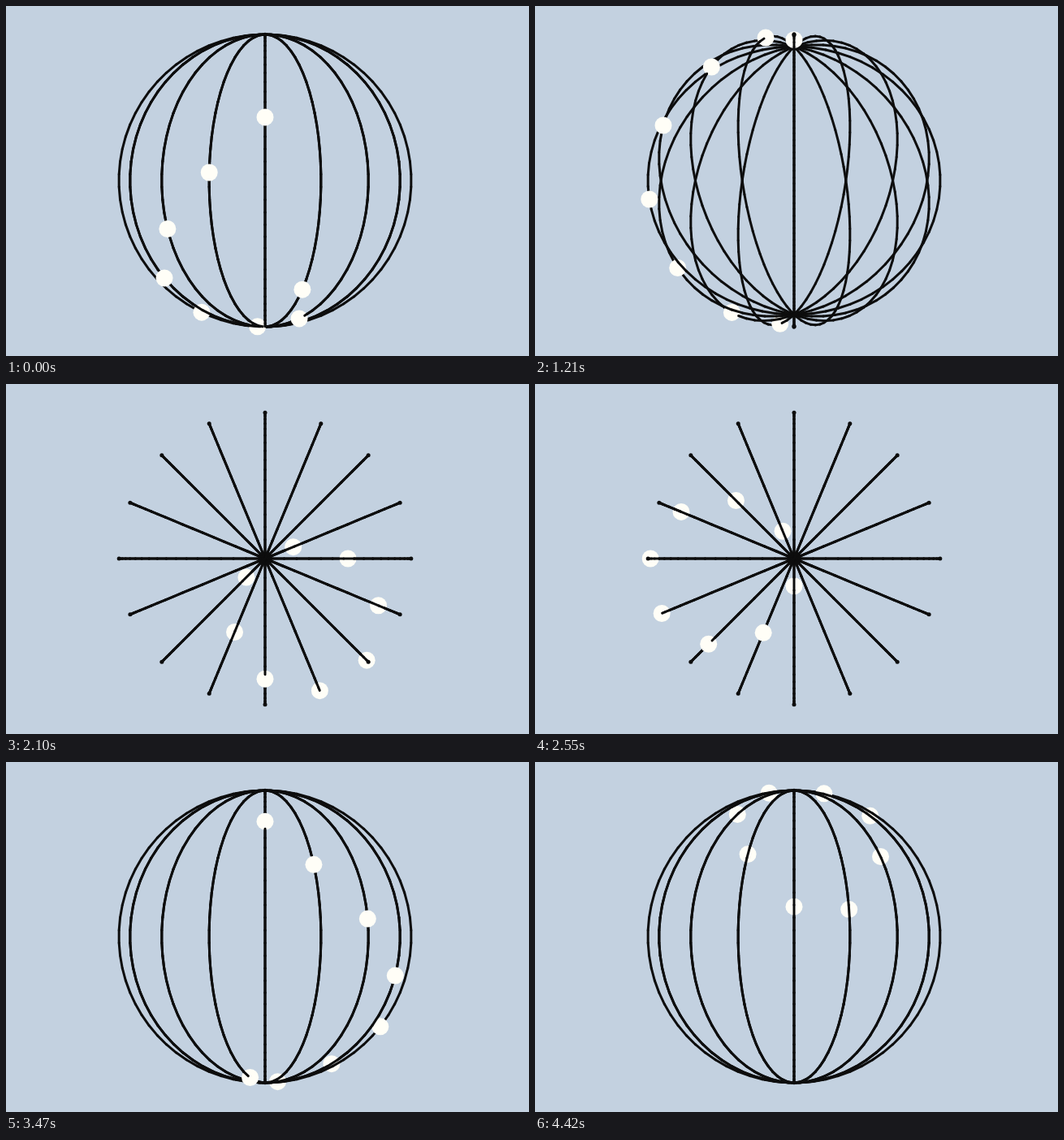
Recreate the animation shown at these times as an HTML page with a canvas. Size 644 by 431 pixels, loop 4.52 s.

```html
<!DOCTYPE html>
<html>
<head>
<meta charset="utf-8">
<style>
  html, body { margin: 0; width: 100%; height: 100%; overflow: hidden; background: #c3d1e0; }
  canvas { display: block; }
</style>
</head>
<body>
<canvas id="stage" width="644" height="431"></canvas>
<script>
const ctx = document.getElementById('stage').getContext('2d');
const LOOP = 4520, TICK = 30;
const CX = 319, CY = 215, R = 180, DOT = 10.5;
const RINGS = 8, SEGMENTS = 72;
const rad = deg => deg * Math.PI / 180;

// [time in ms, angle of the first dot in degrees]; the speed varies slightly
const pace = [[0, 64.3], [590, 214.3], [1210, 368], [1640, 484.2],
              [2550, 709.2], [3470, 938], [4420, 1181.8]];

// Advance in short ticks, restarting the tick count at each pace point
function sample(t) {
  const i = pace.findLastIndex(p => p[0] <= t);
  const [t0, a0] = pace[i];
  if (i === pace.length - 1) return [t0, a0];
  const [t1, a1] = pace[i + 1];
  const time = t0 + Math.floor((t - t0) / TICK) * TICK;
  return [time, a0 + (a1 - a0) * (time - t0) / (t1 - t0)];
}

function ease(t, start, end) {
  const u = Math.min(1, Math.max(0, (t - start) / (end - start)));
  return (1 - Math.cos(Math.PI * u)) / 2;
}

// Point on the meridian at the given longitude, after tilting the globe
function project(angle, longitude, tilt) {
  const side = Math.sin(angle) * Math.sin(longitude);
  const front = Math.sin(angle) * Math.cos(longitude);
  const up = Math.cos(angle);
  return {
    x: CX - R * side,
    y: CY - R * (up * Math.cos(tilt) + front * Math.sin(tilt)),
    z: R * (front * Math.cos(tilt) - up * Math.sin(tilt))
  };
}

function drawSegment({ a, b }) {
  const length = Math.hypot(b.x - a.x, b.y - a.y);
  ctx.lineWidth = length < 1 ? 5 : 3; // segments seen end-on leave a small knot
  ctx.beginPath();
  ctx.moveTo(a.x, a.y);
  ctx.lineTo(b.x + 0.01, b.y);
  ctx.stroke();
}

function drawDot({ x, y }) {
  ctx.beginPath();
  ctx.arc(x, y, DOT, 0, 2 * Math.PI);
  ctx.fill();
}

function draw(t) {
  const [time, angle] = sample(t);
  const tilt = rad(90 * (ease(time, 1008, 1598) + ease(time, 2680, 3270)));
  const items = [];

  for (let k = 0; k < RINGS; k++) {
    const longitude = rad(k * 180 / RINGS);
    const points = Array.from({ length: SEGMENTS + 1 }, (_, i) =>
      project(rad((i - 0.5) * 360 / SEGMENTS), longitude, tilt));
    for (let i = 0; i < SEGMENTS; i++) {
      const a = points[i], b = points[i + 1];
      items.push({ a, b, z: (a.z + b.z) / 2 });
    }
    const dot = project(rad(angle) + longitude, longitude, tilt);
    items.push({ ...dot, z: dot.z + DOT * 0.8 });
  }

  ctx.fillStyle = '#c3d1e0';
  ctx.fillRect(0, 0, 644, 431);
  ctx.fillStyle = '#fffef7';
  ctx.strokeStyle = '#0d0d0d';
  ctx.lineCap = 'round';
  items.sort((p, q) => p.z - q.z);
  for (const item of items) item.a ? drawSegment(item) : drawDot(item);
}

function frame() {
  draw(performance.now() % LOOP);
  requestAnimationFrame(frame);
}
frame();
</script>
</body>
</html>
```
